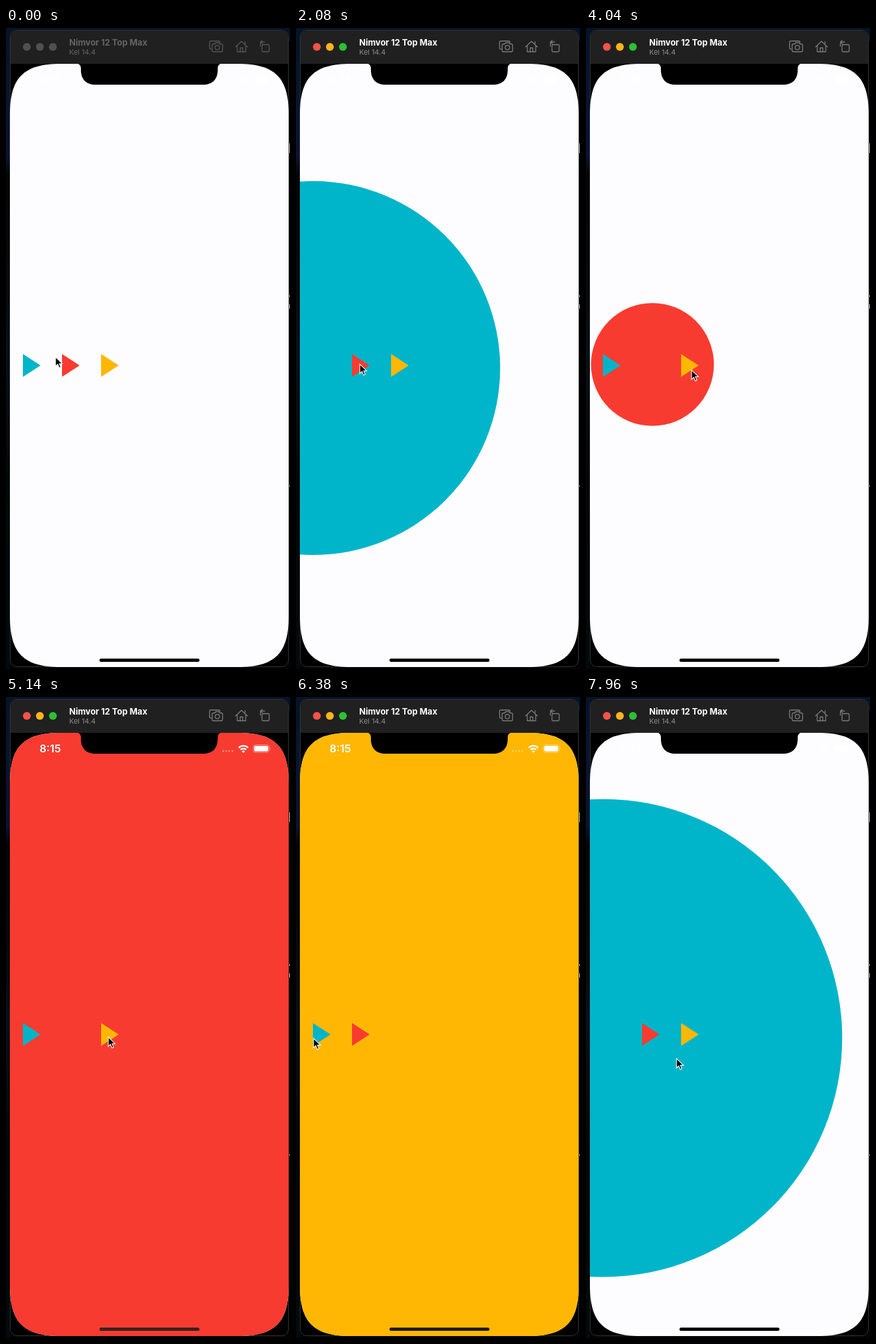
An HTML page for the animation above (8000 ms loop, 436 px wide and 984 px high).

```html
<!DOCTYPE html>
<html lang="en">
<head>
<meta charset="utf-8">
<title>Ripple</title>
<style>
  html, body { margin: 0; width: 100%; height: 100%; overflow: hidden; background: #030405; }
  svg { display: block; width: 100%; height: 100%; }
  text { font-family: Inter, "Open Sans", sans-serif; }
  #bar { --text: #fff; --sub: #8c8c8c; --icon: #7c7c7c; --red: #f6524b; --amber: #fdb41c; --green: #2cc132; }
  #bar.idle { --text: #646464; --sub: #646464; --icon: #565656; --red: #505050; --amber: #505050; --green: #505050; }
  .icons { fill: none; stroke: var(--icon); stroke-width: 1.3; stroke-linejoin: round; stroke-linecap: round; }
</style>
</head>
<body>
<svg viewBox="0 0 436 984">
  <defs>
    <linearGradient id="wall" x2="0" y2="1">
      <stop offset="0" stop-color="#04142a"/>
      <stop offset=".1" stop-color="#08152f"/>
      <stop offset=".2" stop-color="#0c1433"/>
      <stop offset=".23" stop-color="#040506"/>
      <stop offset=".42" stop-color="#0a0b0c"/>
      <stop offset=".5" stop-color="#08111c"/>
      <stop offset=".62" stop-color="#0a0b0c"/>
      <stop offset=".7" stop-color="#030708"/>
      <stop offset="1" stop-color="#030b0c"/>
    </linearGradient>
    <clipPath id="screen">
      <path d="M6 133C6 76 27 55 84 55H356C413 55 434 76 434 133V903C434 960 413 981 356 981H84C27 981 6 960 6 903Z"/>
    </clipPath>
  </defs>

  <rect width="436" height="984" fill="#030405"/>
  <rect width="436" height="20" fill="#04142a"/>
  <rect width="6" height="984" fill="url(#wall)"/>
  <path d="M435 177h1v15h-1zM435 410h1v3h-1zM435 424h1v7h-1zM435 702h1v2h-1z" fill="#ddd"/>

  <rect x="6.5" y="3.5" width="427" height="977" rx="10" stroke="#343434"/>
  <g id="bar">
    <path d="M7 55V14Q7 4 17 4H423Q433 4 433 14V55Z" fill="#202020"/>
    <circle cx="32" cy="29" r="6" fill="var(--red)"/>
    <circle cx="52" cy="29" r="6" fill="var(--amber)"/>
    <circle cx="72" cy="29" r="6" fill="var(--green)"/>
    <text x="97" y="27" font-size="13" font-weight="700" fill="var(--text)">Nimvor 12 Top Max</text>
    <text x="97" y="41" font-size="11" fill="var(--sub)">Kel 14.4</text>
    <g class="icons">
      <path d="M315 32.5h-.5q-2-.3-2-2.500v-8q0-2 2-2h12q2 0 2 2"/>
      <path d="M318.500 24.500h2l1.500-2h5l1.500 2h2q2 0 2 2v8q0 2-2 2h-12q-2 0-2-2v-8q0-2 2-2z"/>
      <circle cx="324.500" cy="30" r="3.300"/>
      <path d="M352.500 29l9-8.500 9 8.500M355 27v9.500h13V27M359.500 36v-5.500h4V36M367 24v-3"/>
      <rect x="393" y="25.500" width="11" height="11" rx="1.500"/>
      <path d="M390.500 28v-3q0-3.500 3.500-3.500h3M393.500 19l-3 2.500 3 2.500"/>
    </g>
  </g>

  <g clip-path="url(#screen)">
    <rect y="55" width="436" height="929" fill="#fdfcff"/>
    <circle id="ripple" r="0"/>
    <path d="M26 500.500l27 17.500-27 17.500z" fill="#00b5c9"/>
    <path d="M86 500.500l27 17.500-27 17.500z" fill="#f83b30"/>
    <path d="M146 500.500l27 17.500-27 17.500z" fill="#ffb703"/>
    <g fill="#fff">
      <text x="51.500" y="85" font-size="16.500" font-weight="600">8:15</text>
      <path d="M332 83h17" stroke="#fff" stroke-opacity=".4" stroke-width="2.500" stroke-dasharray="2.500 2.300"/>
      <path d="M357.300 77.800a10.300 10.300 0 0 1 14.400 0M360 81a6.500 6.500 0 0 1 9 0" fill="none" stroke="#fff" stroke-width="2.400"/>
      <path d="M362 83.300q2.500-2 5 0l-2.500 2.700z"/>
      <rect x="379.500" y="73.500" width="24.500" height="11.500" rx="3.500" fill="none" stroke="#fff" stroke-opacity=".45"/>
      <rect x="381" y="75" width="21.500" height="8.500" rx="2"/>
      <path d="M405.300 77.500q2 1.700 0 3.500z" fill-opacity=".5"/>
    </g>
    <path d="M108 54Q115 55.500 115 62V64C115 79 123 87 138 87H302C317 87 325 79 325 64V62Q325 55.500 332 54Z"/>
    <rect id="home" x="143.500" y="968" width="153.500" height="5" rx="2.500"/>
  </g>

  <path id="cursor" d="M0 0V14.500L3.400 11.300 5.700 16.800 8.200 15.700 5.900 10.400H10.600Z" stroke="#fff" stroke-width="1.100"/>
</svg>
<script>
const $ = id => document.getElementById(id);
const LOOP = 8000, ACTIVATE = 1300;
const GROW = 1000, FULL_RADIUS = Math.hypot(428, 926);

const taps = [
  { at: 1705, x: 26.5, y: 522, color: '#00b5c9', home: '#0a1416' },
  { at: 3825, x: 102, y: 516.5, color: '#f83b30', home: '#33231f' },
  { at: 5680, x: 157, y: 522, color: '#ffb703', home: '#1f1c14' },
  { at: 7536, x: 26.5, y: 523.5, color: '#00b5c9', home: '#0a1416' }
];

// Pointer stops: time, x, y
const stops = [
  [0, 76, 505], [500, 76, 505], [1250, 27, 522], [1705, 26.5, 522],
  [2080, 98, 516], [2500, 105, 515], [3440, 105, 515], [3825, 102, 516.5],
  [4040, 162, 525], [4500, 157, 522], [5680, 157, 522],
  [6250, 27, 524], [7536, 26.5, 523.5], [7960, 139, 555]
];

const easeInOut = p => p < .5 ? 2 * p * p : 1 - 2 * (1 - p) ** 2;

function pointerAt(t) {
  const i = stops.findIndex(s => s[0] > t);
  if (i < 0) return stops.at(-1).slice(1);
  const [t0, x0, y0] = stops[i - 1], [t1, x1, y1] = stops[i];
  const k = easeInOut((t - t0) / (t1 - t0));
  return [x0 + (x1 - x0) * k, y0 + (y1 - y0) * k];
}

// The picture advances in steps of 20, 20 and 100 ms.
function stepTime(t) {
  const phase = (t + 60) % 140;
  return Math.max(0, t - phase + Math.min(40, Math.floor(phase / 20) * 20));
}

function draw(t) {
  const tap = taps.findLast(p => p.at <= t);
  const progress = tap ? Math.min(1, (t - tap.at) / GROW) : 0;
  const radius = FULL_RADIUS * easeInOut(progress);
  const ripple = $('ripple');
  ripple.setAttribute('r', radius);
  if (tap) {
    ripple.setAttribute('cx', tap.x);
    ripple.setAttribute('cy', tap.y);
    ripple.setAttribute('fill', tap.color);
  }
  $('home').setAttribute('fill', radius > 520 ? tap.home : '#000');
  $('bar').classList.toggle('idle', t < ACTIVATE);
  $('cursor').setAttribute('transform', `translate(${pointerAt(t)})`);
}

const start = performance.now();
function tick() {
  draw(stepTime((performance.now() - start) % LOOP));
  requestAnimationFrame(tick);
}
tick();
</script>
</body>
</html>
```
